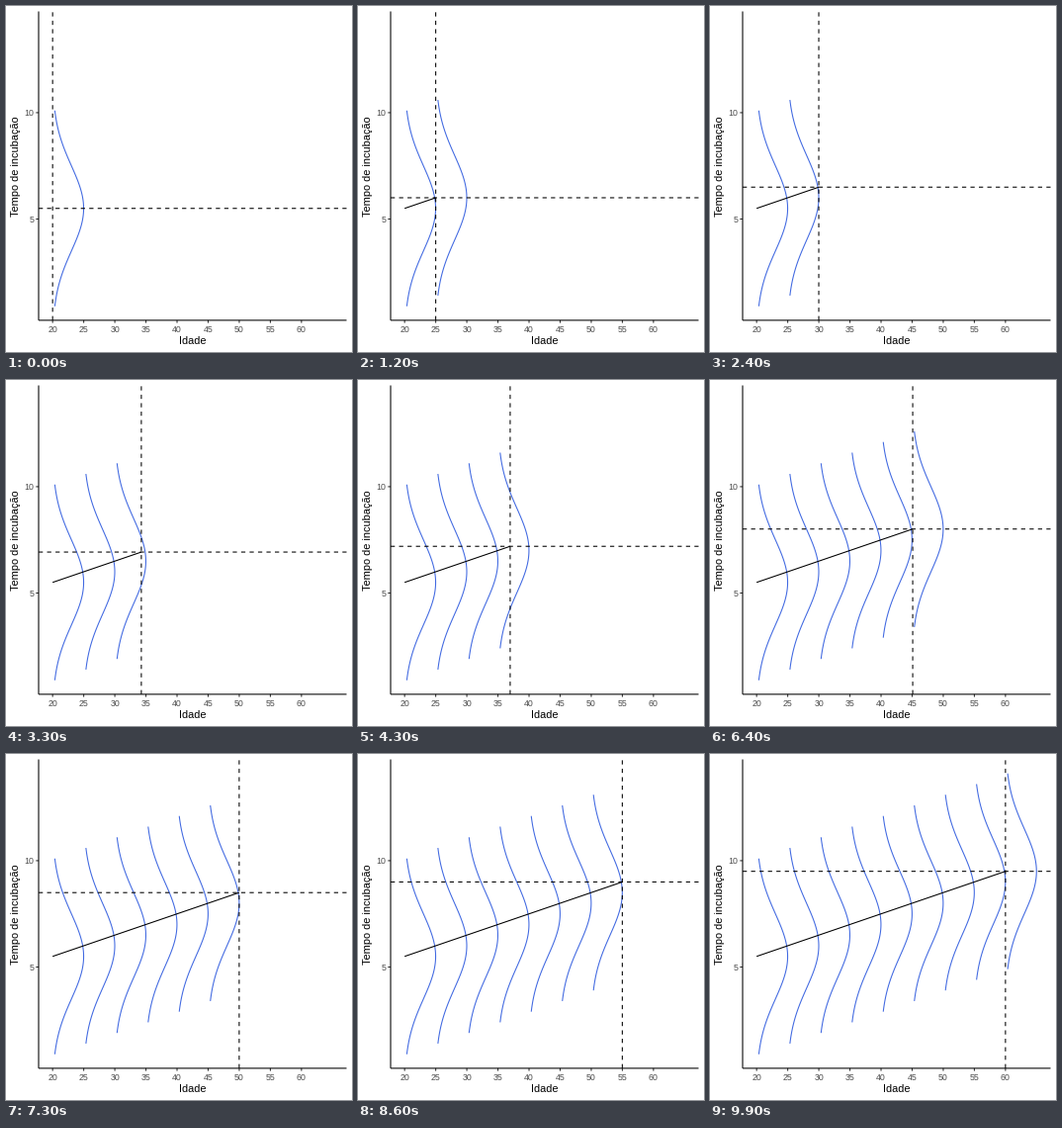
Animation, 350 px wide and 350 px high, one loop 10000 ms. Source, as a matplotlib script:

```python
import math

import matplotlib.pyplot as plt
import numpy as np
from matplotlib.animation import FuncAnimation

SIZE, DPI = 350, 72
FRAMES, INTERVAL = 100, 100
LEFT, RIGHT, TOP, BOTTOM = 33.0, 344.5, 5.5, 317.9
X_MIN, X_MAX = 17.75, 67.25
Y_MIN, Y_MAX = 0.24, 14.76
LINE_WIDTH = 1.067
SD, HALF_SPAN = 2.0, 4.6

AGES = np.arange(20, 61, 5)
KEYS = [math.floor((FRAMES - 1) * (age - 20) / 40 + 0.5) for age in AGES]

plt.rcParams["font.family"] = "Liberation Sans"
fig = plt.figure(figsize=(SIZE / DPI, SIZE / DPI), dpi=DPI, facecolor="white")
ax = fig.add_axes([0, 0, 1, 1])
ax.set(xlim=(0, SIZE), ylim=(SIZE, 0))
ax.axis("off")


def px(x):
    return LEFT + (x - X_MIN) / (X_MAX - X_MIN) * (RIGHT - LEFT)


def py(y):
    return BOTTOM - (y - Y_MIN) / (Y_MAX - Y_MIN) * (BOTTOM - TOP)


def mean_time(age):
    return 5.5 + 0.1 * (age - 20)


def stroke(xs, ys, color="black", **style):
    line, = ax.plot(xs, ys, color=color, lw=LINE_WIDTH, snap=False,
                    solid_capstyle="butt", dash_capstyle="butt", **style)
    return line


def density_curve(age):
    offset = np.linspace(-HALF_SPAN, HALF_SPAN, 121)
    density = np.exp(-0.5 * (offset / SD) ** 2) / (SD * math.sqrt(2 * math.pi))
    return stroke(px(age + 25 * density), py(mean_time(age) + offset),
                  "#4169E1", zorder=2)


def draw_axes():
    stroke([LEFT, LEFT], [BOTTOM, TOP], zorder=5)
    stroke([LEFT, RIGHT], [BOTTOM, BOTTOM], zorder=5)
    label = dict(fontsize=8.8, color="#4D4D4D")
    for age in AGES:
        stroke([px(age)] * 2, [BOTTOM, BOTTOM + 2.75], "#333333", zorder=4)
        ax.text(px(age), 330, str(age), ha="center", va="baseline", **label)
    for y in (5, 10):
        stroke([LEFT - 2.75, LEFT], [py(y)] * 2, "#333333", zorder=4)
        ax.text(28.05, py(y) + 3.1, str(y), ha="right", va="baseline", **label)
    ax.text((LEFT + RIGHT) / 2, 342.5, "Idade", fontsize=11,
            ha="center", va="baseline")
    ax.text(13.2, (TOP + BOTTOM) / 2, "Tempo de incubação", fontsize=11,
            rotation=90, rotation_mode="anchor", ha="center", va="baseline")


def cubic_in_out(t):
    return 4 * t ** 3 if t < 0.5 else 1 - 4 * (1 - t) ** 3


def current_age(frame):
    i = min(int(np.searchsorted(KEYS, frame, side="right")) - 1, len(KEYS) - 2)
    t = (frame - KEYS[i]) / (KEYS[i + 1] - KEYS[i])
    return AGES[i] + 5 * cubic_in_out(t)


draw_axes()
curves = [density_curve(age) for age in AGES]
trend = stroke([], [], zorder=3)
across = stroke([], [], linestyle=(0, (4, 4)), zorder=3)
upright = stroke([], [], linestyle=(0, (4, 4)), zorder=3)


def update(frame):
    age = current_age(frame)
    x, y = px(age), py(mean_time(age))
    for key, curve in zip(KEYS, curves):
        curve.set_visible(frame >= key)
    trend.set_data([px(20), x], [py(mean_time(20)), y])
    across.set_data([LEFT, RIGHT], [y, y])
    upright.set_data([x, x], [BOTTOM, TOP])
    return [*curves, trend, across, upright]


anim = FuncAnimation(fig, update, frames=FRAMES, interval=INTERVAL,
                     init_func=lambda: update(0), repeat=True, repeat_delay=0)
plt.show()
```
